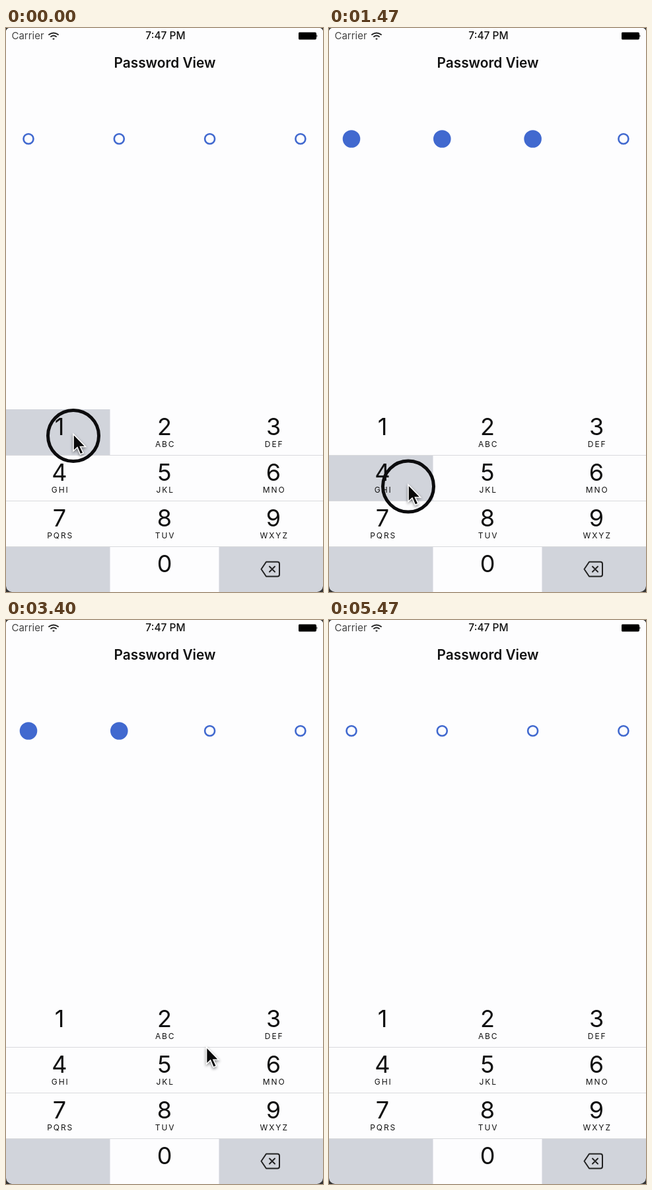
Animation, 480 px wide and 852 px high, one loop 6.27 s. Source, as an HTML page:

```html
<!DOCTYPE html>
<html lang="en">
<head>
<meta charset="utf-8">
<title>Password View</title>
<style>
  html, body { margin: 0; width: 100%; height: 100%; overflow: hidden; background: #fdfdfe; }
  svg { display: block; width: 480px; height: 852px; font-family: Inter, Roboto, sans-serif; fill: #111; }
  text { text-anchor: middle; }
  .num { font-size: 36px; }
  .abc { font-size: 12px; letter-spacing: 1.9px; }
  .line { stroke: #d9dadd; }
  .icon { fill: none; stroke: #222; stroke-width: 2; stroke-linejoin: round; stroke-linecap: round; }
</style>
</head>
<body>
<svg viewBox="0 0 480 852">
  <rect width="480" height="852" fill="#fdfdfe"/>
  <text x="33" y="17" font-size="15" fill="#444">Carrier</text>
  <path class="icon" d="M65 10q7-5 14 0M68 13q4-3 8 0M71.500 16.500h1"/>
  <text x="241.500" y="17" font-size="15.500" font-weight="500">7:47 PM</text>
  <path d="M444 6.500h24q2 0 2 2v7q0 2-2 2h-24q-1 0-1-2v-7q0-2 1-2zM470.500 10q2 2 0 4z" fill="#000"/>
  <text x="240.500" y="60" font-size="20.800" font-weight="600">Password View</text>
  <g id="dots"></g>
  <g id="keys"></g>
  <path class="icon" d="M394 806.500h17q3 0 3 3v16q0 3-3 3h-17l-7.500-11zM399 813.500l8 8m0-8l-8 8"/>
  <path d="M0 843v9h9q-8-1-9-9zM480 843v9h-9q8-1 9-9zM0 4V0h4q-3 1-4 4zM480 4V0h-4q3 1 4 4z" fill="#333"/>
  <g id="mouse">
    <circle id="ring" cy="2.500" r="38.500" fill="none" stroke="#0c0c0e" stroke-width="5"/>
    <path d="M0 0V25.500L6 20l4.500 10.500 4.500-2-4.500-9.500h8z" fill="#0a0a0a" stroke="#fff" stroke-width="1.600"
      style="filter:drop-shadow(0 2px 2px #0007)"/>
  </g>
</svg>
<script>
const LOOP = 6270, HOLD = 130, FILL = 120, LIT = 315, TRAVEL = 500;
const BLUE = '#4169cf', GRAY = '#d1d4db';
const $ = id => document.getElementById(id);

function set(el, attrs) {
  for (const k in attrs) el.setAttribute(k, attrs[k]);
}
function add(parent, tag, attrs, text = '') {
  const el = document.createElementNS('http://www.w3.org/2000/svg', tag);
  set(el, attrs);
  el.textContent = text;
  return parent.appendChild(el);
}

// Keypad, numbered by cell from 0 to 11
const letters = ['', 'ABC', 'DEF', 'GHI', 'JKL', 'MNO', 'PQRS', 'TUV', 'WXYZ'];
const edges = [0, 157.5, 322.5, 480];
const row = cell => Math.floor(cell / 3);

function tile(cell) {
  const x = edges[cell % 3];
  return add($('keys'), 'rect', { x, y: 576 + 69 * row(cell), width: edges[cell % 3 + 1] - x, height: 69.5, fill: GRAY });
}
function label(cell, num, abc = '') {
  const x = 81 + 162 * (cell % 3) - 3 * (cell % 3 === 1), y = 69 * row(cell);
  add($('keys'), 'text', { x, y: 614.5 + y, class: 'num' }, num);
  add($('keys'), 'text', { x: x + 1.2, y: 633 + y, class: 'abc' }, abc);
}

const tiles = letters.map((_, cell) => tile(cell));
tile(9);
tile(11);
for (let i = 1; i < 4; i++) add($('keys'), 'path', { d: `M0 ${576.5 + 69 * i}H480`, class: 'line' });
letters.forEach((abc, cell) => label(cell, cell + 1, abc));
label(10, 0);

const dots = [0, 1, 2, 3].map(i => add($('dots'), 'circle', { cx: 34 + 137.3 * i, cy: 167.5 }));

// Where the pointer taps each digit; 0 lies below the stage
const spots = [[165, 900], [102, 613.5], [242, 614], [411, 619], [120, 690]];
const rounds = [
  { taps: [[0, 1], [385, 2], [770, 3], [1400, 4]], shake: 1850, end: 2480, color: '#4be575' },
  { taps: [[2570, 1], [2870, 2], [3690, 4], [3880, 4]], shake: 4400, end: 5130, color: '#f0473f' }
];
const hits = rounds.flatMap(r => r.taps);
const missed = [3148, 3], exit = [5100, 0];
const stops = [...hits, missed, exit].sort((a, b) => a[0] - b[0]);

const clamp = x => Math.min(1, Math.max(0, x));
const within = (t, start, span) => t >= start && t < start + span;

function pointer(t) {
  const next = stops.find(s => s[0] > t) || exit;
  const last = stops.findLast(s => s[0] <= t);
  const start = Math.max(last[0] + HOLD, next[0] - TRAVEL);
  const k = 1 - (1 - clamp((t - start) / (next[0] - start))) ** 1.3;
  return spots[last[1]].map((a, i) => a + (spots[next[1]][i] - a) * k);
}

function draw(t) {
  set($('mouse'), { transform: `translate(${pointer(t)})` });
  set($('ring'), { opacity: +stops.some(s => within(t, s[0], HOLD)) });
  tiles.forEach((el, cell) => set(el, {
    opacity: +hits.some(([down, digit]) => digit === cell + 1 && within(t, down, LIT))
  }));

  const { taps, shake, end, color } = rounds.find(r => t < r.end + 80) || rounds[1];
  const k = clamp((t - shake) / (end - shake));
  const shift = 113 * (1 - k) ** 2 * Math.sin(Math.max(0, t - shake) * Math.PI / 160);
  set($('dots'), { transform: `translate(${shift})` });
  dots.forEach((el, i) => {
    const full = clamp((t - taps[i][0] - FILL) / 40) * clamp((end + 80 - t) / 80);
    const paint = k > 0 && full > 0 ? color : BLUE;
    set(el, { r: 7.5 + 4.5 * full, fill: paint, 'fill-opacity': full, stroke: paint, 'stroke-width': 2.6 });
  });
}

function tick(now) {
  draw(now % LOOP);
  requestAnimationFrame(tick);
}
draw(0);
requestAnimationFrame(tick);
</script>
</body>
</html>
```
